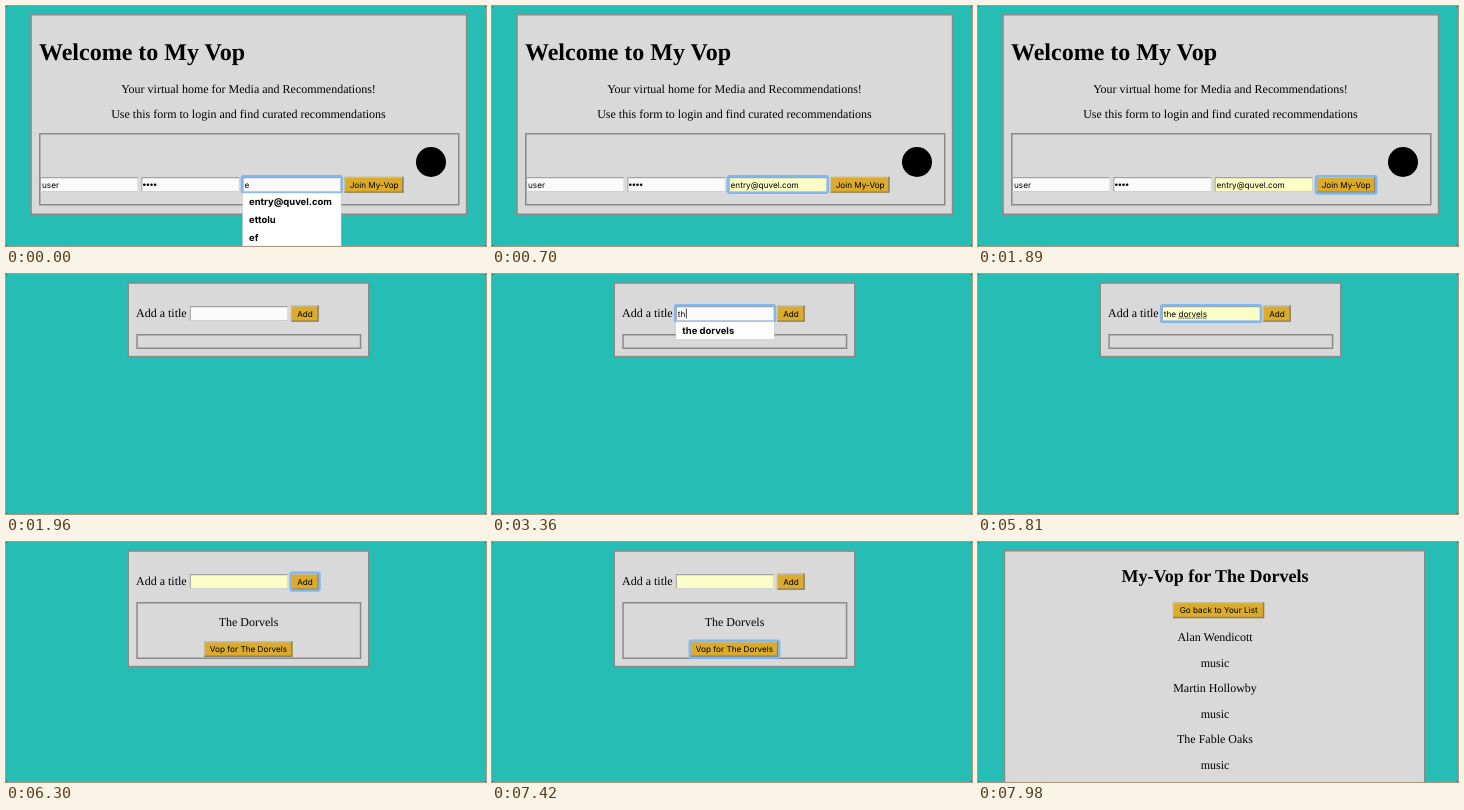
Animation, 480 px wide and 240 px high, one loop 8000 ms. Source, as an HTML page:

```html
<!DOCTYPE html>
<html lang="en">
<head>
<meta charset="utf-8">
<title>Login and list demo</title>
<style>
html, body { margin: 0; width: 100%; height: 100%; overflow: hidden; background: #26bdb5; }
svg { display: block; width: 480px; height: 240px; }
.serif { font: 12px "Liberation Serif", "Times New Roman", serif; }
.h1 { font-size: 24px; font-weight: bold; }
.h2 { font-size: 18px; font-weight: bold; }
.ui { font: 8.2px Inter, sans-serif; }
.item { font: bold 9.45px Inter, sans-serif; }
text { text-rendering: geometricPrecision; }
</style>
</head>
<body>
<svg id="stage" viewBox="0 0 480 240" xmlns="http://www.w3.org/2000/svg"></svg>
<script>
const LOOP = 8000;
const GREY = '#8a8a8a', CARD = '#d9d9d9', GOLD = '#dbab2d', YELLOW = '#fbfdc6', BLUE = '#7db8f2';
const BRAND = 'Vop', BAND = 'The Dorvels', QUERY = 'the dorvels', MAIL = 'entry@quvel.com';
const svg = document.getElementById('stage');

const rect = (x, y, w, h, fill, more = '') =>
  `<rect x="${x}" y="${y}" width="${w}" height="${h}" fill="${fill}" ${more}/>`;
const text = (x, y, s, cls = 'serif', more = '') =>
  `<text x="${x}" y="${y}" class="${cls}" xml:space="preserve" ${more}>${s}</text>`;
const mid = (x, y, s, cls) => text(x, y, s, cls, 'text-anchor="middle"');
const box = (x, y, w, h, line = 1.5) =>
  rect(x + line / 2, y + line / 2, w - line, h - line, CARD, `stroke="${GREY}" stroke-width="${line}"`);
const ring = (x, y, w, h) =>
  rect(x - .8, y - .8, w + 1.6, h + 1.6, 'none', `rx="1.8" stroke="${BLUE}" stroke-width="2.2"`);

function button(x, y, w, h, label, focus) {
  const r = x + w, b = y + h;
  return rect(x, y, w, h, GOLD) +
    `<path d="M${x} ${b - .6}V${y + .6}H${r}" fill="none" stroke="#c3bda9" stroke-width="1.2"/>` +
    `<path d="M${x} ${b - .7}H${r - .7}V${y}" fill="none" stroke="#85816f" stroke-width="1.4"/>` +
    mid(x + w / 2, y + h / 2 + 2.9, label, 'ui') + (focus ? ring(x, y, w, h) : '');
}

function field(x, y, value, { fill = '#fafafa', focus, caret, spell } = {}) {
  const w = 98.5, h = 15;
  let s = rect(x, y, w, h, fill) +
    `<path d="M${x + .5} ${y + h}V${y + .6}H${x + w}" fill="none" stroke="#a2a2a2" stroke-width="1.1"/>` +
    `<path d="M${x} ${y + h - .5}H${x + w - .5}V${y}" fill="none" stroke="#d0d0d0"/>` +
    text(x + 2, y + 10.5, value, 'ui');
  if (focus) s += ring(x, y, w, h);
  if (caret) s += rect(x + 2.6 + width(value), y + 2.5, .8, 10, '#222');
  if (spell) {
    const from = x + 2 + width('the '), to = x + 2 + width(value);
    s += `<path d="M${from} ${y + 12.1}H${to}" stroke="#444" stroke-dasharray="1.5 .7"/>`;
  }
  return s;
}

const pen = document.createElement('canvas').getContext('2d');
function width(s) {
  pen.font = '8.2px Inter, sans-serif';
  return pen.measureText(s).width;
}

function menu(x, y, items, active) {
  const pitch = 17.7;
  return rect(x, y, 98.5, items.length * pitch, '#fff', 'stroke="#c4c4c4" stroke-width=".5"') +
    items.map((s, i) =>
      (i === active ? rect(x, y + i * pitch, 98.5, pitch, '#d2d2d2') : '') +
      text(x + 6.5, y + 12.3 + i * pitch, s, 'item')).join('');
}

function login(t) {
  const hover = t >= 280, open = t < 630, onButton = t >= 1400;
  return box(24.3, 8, 437, 201) +
    text(33, 54, 'Welcome to My ' + BRAND, 'serif h1') +
    mid(242.5, 87, 'Your virtual home for Media and Recommendations!') +
    mid(242.5, 112, 'Use this form to login and find curated recommendations') +
    box(33, 127, 420.5, 72.5) +
    '<circle cx="425" cy="156" r="15" fill="#000"/>' +
    field(34, 171, 'user') +
    field(135.3, 171, '') +
    [0, 1, 2, 3].map(i => `<circle cx="${138.3 + i * 3.6}" cy="178.7" r="1.3"/>`).join('') +
    field(236.6, 171, hover ? MAIL : 'e', { fill: hover ? YELLOW : '#fafafa', focus: !onButton }) +
    button(338.6, 170.8, 59, 16, 'Join My-' + BRAND, onButton) +
    (open ? menu(236.6, 187, [MAIL, 'ettolu', 'ef'], hover ? 0 : -1) : '');
}

// moments at which another letter of the query appears
const keys = [3220, 3360, 3500, 3780, 3850, 4060];

function list(t) {
  const preview = t >= 4760, added = t >= 6090;
  const typed = keys.filter(k => t >= k).length;
  const value = added ? '' : preview ? QUERY : QUERY.slice(0, typed);
  const addFocus = t >= 5950 && t < 6510;
  let s = box(121.5, 8.3, 242, added ? 117 : 75) +
    text(130, 43, 'Add a title') +
    box(130.3, 60, 225, added ? 57 : 15) +
    field(183.8, 32, value, {
      fill: preview ? YELLOW : '#fafafa',
      focus: t >= 2730 && t < 5950,
      caret: typed > 0 && !preview,
      spell: t >= 5460 && !added
    }) +
    button(285.3, 31.5, 27.5, 16.3, 'Add', addFocus);
  if (t >= 3290 && t < 5040)
    s += menu(183.8, 47.8, t < 3360 ? [QUERY, 'test'] : [QUERY], preview ? 0 : -1);
  if (added)
    s += mid(242.5, 84, BAND) +
      button(198.5, 99.3, 88, 15.7, BRAND + ' for ' + BAND, t >= 6720);
  return s;
}

function results() {
  const rows = ['Alan Wendicott', 'music', 'Martin Hollowby', 'music', 'The Fable Oaks', 'music'];
  return box(25.7, 8, 421.8, 260) +
    mid(237, 40, `My-${BRAND} for ${BAND}`, 'serif h2') +
    button(195.2, 60.2, 91, 16, 'Go back to Your List') +
    rows.map((s, i) => mid(237, 99.3 + i * 25.5, s)).join('');
}

let last = '';
function draw(t) {
  const page = t < 1960 ? login(t) : t < 7490 ? list(t) : results();
  const next = rect(0, 0, 480, 240, '#1c4d4b') + rect(0, 0, 480, 240, '#26bdb5', 'rx="2"') + page;
  if (next !== last) svg.innerHTML = last = next;
}

const start = performance.now();
function tick() {
  draw((performance.now() - start) % LOOP);
  requestAnimationFrame(tick);
}
tick();
</script>
</body>
</html>
```
